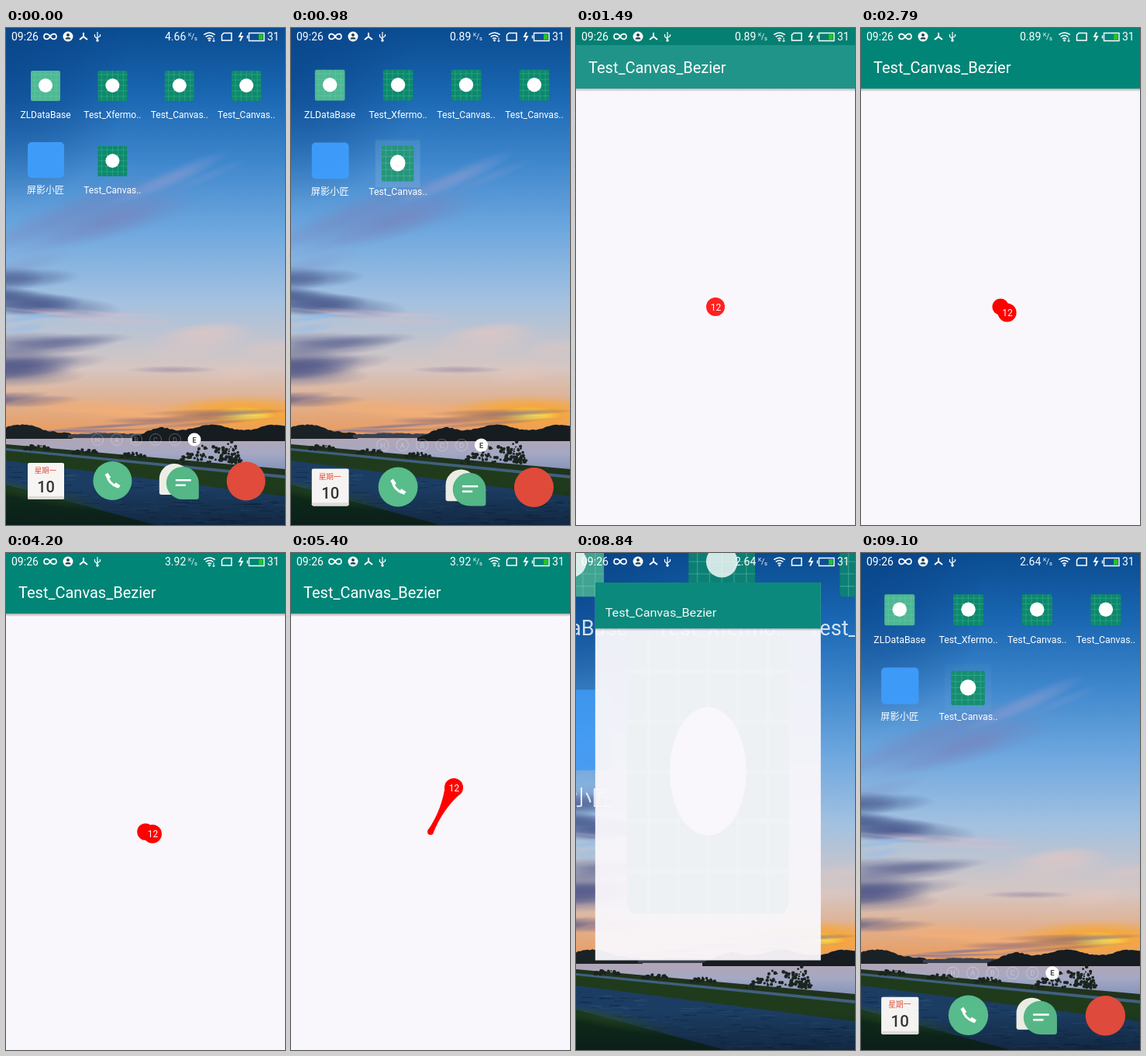
An HTML page with a canvas that plays this animation: 360x640 px, repeating every 9.14 s.

```html
<!DOCTYPE html>
<html lang="zh">
<head>
<meta charset="utf-8">
<style>
html, body { margin: 0; width: 100%; height: 100%; overflow: hidden; }
canvas { display: block; }
</style>
</head>
<body>
<canvas id="stage" width="360" height="640"></canvas>
<script>
const LOOP = 9140, TAU = Math.PI * 2;
const TEAL = '#008577', TILE = '#0d8a6c', RED = '#ff0000', PAPER = '#f9f7fb';
const GRID = { x: 51, y: 74, dx: 86.4, dy: 97 };
let ctx = document.getElementById('stage').getContext('2d');

const clamp = v => Math.max(0, Math.min(1, v));
const mix = (a, b, p) => a + (b - a) * p;

let seed = 7;
function random(low, high) {
  seed = (seed * 16807) % 2147483647;
  return mix(low, high, seed / 2147483647);
}

function rect(x, y, w, h, color, r = 0) {
  ctx.fillStyle = color;
  ctx.beginPath();
  ctx.roundRect(x, y, w, h, r);
  ctx.fill();
}
function disc(x, y, r, color) {
  ctx.fillStyle = color;
  ctx.beginPath();
  ctx.arc(x, y, r, 0, TAU);
  ctx.fill();
}
function stroke(d, width = 1.3, color = '#fff') {
  ctx.lineWidth = width;
  ctx.strokeStyle = color;
  ctx.stroke(new Path2D(d));
}
function label(s, x, y, size, align = 'center', color = '#fff', weight = 400) {
  ctx.font = `${weight} ${size}px Roboto, "Noto Sans CJK SC", "Noto Sans CJK", sans-serif`;
  ctx.textAlign = align;
  ctx.fillStyle = color;
  ctx.fillText(s, x, y);
}
function fade(y0, y1, ...colors) {
  const g = ctx.createLinearGradient(0, y0, 0, y1);
  colors.forEach((c, i) => g.addColorStop(i / (colors.length - 1), c));
  return g;
}

// Soft ellipse; rgb is "r,g,b"
function cloud(x, y, rx, ry, rgb, alpha, turn = 0) {
  ctx.save();
  ctx.translate(x, y);
  ctx.rotate(turn);
  ctx.scale(rx, ry);
  const g = ctx.createRadialGradient(0, 0, 0, 0, 0, 1);
  g.addColorStop(0, `rgba(${rgb},${alpha})`);
  g.addColorStop(0.5, `rgba(${rgb},${alpha * 0.6})`);
  g.addColorStop(1, `rgba(${rgb},0)`);
  disc(0, 0, 1, g);
  ctx.restore();
}
// A bank of wind-drawn streaks scattered around one centre
function streaks(count, x, y, rx, ry, rgb, alpha, turn = 0) {
  for (let i = 0; i < count; i++) {
    const along = random(-0.5, 0.5) * rx, across = random(-1, 1) * ry;
    cloud(x + along, y + across + along * Math.tan(turn), rx * random(0.4, 0.8),
      ry * random(0.3, 0.7), rgb, alpha, turn + random(-0.07, 0.07));
  }
}
// Ground layer whose upper edge runs from yLeft to yRight
function ground(yLeft, yRight, color) {
  ctx.fillStyle = color;
  ctx.beginPath();
  ctx.moveTo(0, yLeft);
  ctx.lineTo(360, yRight);
  ctx.lineTo(360, 640);
  ctx.lineTo(0, 640);
  ctx.fill();
}
function trees(x0, x1, base, height, color) {
  ctx.fillStyle = color;
  ctx.beginPath();
  ctx.moveTo(x0, base);
  for (let x = x0; x <= x1; x += 3) {
    const edge = clamp((x - x0) / 40) * clamp((x1 - x) / 60 + 0.15);
    ctx.lineTo(x, base - 4 - height * edge * (0.75 + 0.2 * Math.sin(x / 13)) - random(0, 1.5));
  }
  ctx.lineTo(x1, base);
  ctx.fill();
}
function bush(x, y, w, h) {
  for (let i = 0; i < w * 2; i++) {
    const dx = random(-1, 1);
    disc(x + dx * w, y - random(0, h) * (1 - dx * dx), random(1, 2.5), '#1b251f');
  }
}

function paintWallpaper() {
  rect(0, 0, 360, 530, fade(0, 525, '#0a4c90', '#1a67b3', '#4088cd', '#6fa8df',
    '#a3c1e0', '#d6c6c2', '#e99a5c'));
  cloud(0, 60, 160, 170, '6,58,125', 0.5);
  streaks(7, 90, 250, 190, 38, '120,128,185', 0.28, -0.35);
  streaks(5, 230, 190, 130, 18, '140,155,210', 0.25, -0.4);
  streaks(8, 10, 340, 120, 24, '62,78,132', 0.5);
  streaks(5, 10, 380, 90, 10, '150,188,230', 0.6, -0.1);
  streaks(5, 100, 366, 110, 9, '222,186,198', 0.4, 0.05);
  streaks(10, 25, 422, 130, 26, '72,80,132', 0.45, -0.06);
  streaks(6, 0, 472, 90, 14, '92,88,135', 0.55, -0.1);
  streaks(5, 300, 415, 110, 30, '238,200,190', 0.3, -0.1);
  cloud(215, 440, 60, 5, '150,135,165', 0.6);
  streaks(6, 120, 492, 170, 10, '246,175,115', 0.5);
  cloud(305, 496, 110, 24, '255,165,30', 0.95);
  cloud(306, 498, 42, 10, '255,240,90', 1);
  streaks(5, 230, 503, 130, 8, '140,105,120', 0.6, -0.04);
  streaks(5, 90, 517, 140, 5, '135,120,150', 0.7);

  rect(0, 526, 360, 60, fade(526, 570, '#b4a5b3', '#a4a8c4', '#8592b8'));
  trees(-60, 86, 529, 14, '#1a2226');
  trees(80, 190, 528, 2, '#39414f');
  trees(163, 420, 532, 17, '#161c20');
  ground(536, 568, '#1f331c');
  ground(541, 576, '#41607f');
  ground(544, 580, '#1f3b1c');
  ground(557, 603, '#1c3d63');
  for (let i = 0; i < 260; i++) {
    const x = random(0, 360), y = 562 + x * 0.13 + random(0, 70);
    rect(x, y, random(6, 24), 1, i % 2 ? 'rgba(8,22,42,.35)' : 'rgba(90,125,165,.16)');
  }
  ground(588, 685, '#0f2c1a');
  cloud(40, 600, 100, 12, '50,85,35', 0.5, 0.2);
  rect(0, 590, 360, 50, fade(590, 640, 'rgba(5,15,25,0)', 'rgba(5,15,25,.45)'));
  for (let x = 40; x < 200; x += 62) bush(x, 539 + x * 0.08, 16, 6);
  bush(262, 560, 42, 24);
  bush(290, 558, 14, 26);
}

// App tile, 38 units wide
function tile(x, y, sx, sy, color = TILE) {
  ctx.save();
  ctx.translate(x, y);
  ctx.scale(sx, sy);
  rect(-19, -19, 38, 39, color, 2);
  const alpha = ctx.globalAlpha;
  ctx.globalAlpha = alpha * 0.35;
  for (let i = -14; i < 19; i += 7)
    stroke(`M${i} -19V20M-19 ${i}H19`, 0.6, '#8fe0c4');
  ctx.globalAlpha = alpha;
  disc(0, 0, 9, '#fff');
  ctx.restore();
}

function paintDock() {
  const [calendar, phone, chat, browser] = [0, 1, 2, 3].map(i => GRID.x + i * GRID.dx);
  rect(calendar - 23, 560, 47, 47, '#f7f5f3', 2);
  rect(calendar - 23, 603, 47, 4, '#dedbd8', 2);
  label('星期一', calendar, 573, 9.5, 'center', '#e0503e');
  label('10', calendar + 0.5, 597.5, 20, 'center', '#333', 500);

  disc(phone, 583, 25, '#59bd8c');
  ctx.save();
  ctx.translate(phone, 583);
  stroke('M-7 -7Q-5 4 7 8', 3);
  stroke('M-8 -9l4 6M3 4l6 4', 4.5);
  ctx.restore();

  rect(chat - 26, 561, 39, 40, '#eceee6', [20, 20, 20, 3]);
  rect(chat - 17, 565, 42, 42, '#55b686', [21, 21, 3, 21]);
  rect(chat - 5, 581, 20, 2.5, '#fff');
  rect(chat - 5, 587.5, 13, 2.5, '#fff');

  disc(browser - 0.5, 583.5, 25, '#e04b3c');
}

function paintHome(p) {
  const zoom = Math.exp(1.05 * p);
  ctx.save();
  ctx.globalAlpha = 1 - 0.25 * p;
  ctx.translate(97, 124);
  ctx.scale(zoom, zoom);
  ctx.translate(-97, -124);

  ['ZLDataBase', 'Test_Xfermo..', 'Test_Canvas..', 'Test_Canvas..', '屏影小匠', 'Test_Canvas..']
    .forEach((name, i) => {
      const x = GRID.x + i % 4 * GRID.dx, y = GRID.y + (i >> 2) * GRID.dy;
      if (i === 4) rect(x - 23, y - 24, 47, 46, '#3f9bf8', 5);
      else tile(x, y, 1, 1, i ? TILE : '#4fb994');
      label(name, x, y + 42, 12);
    });

  [...'HABCDE'].forEach((letter, i) => {
    const x = 118 + i * 25, active = i === 5;
    if (active) disc(x, 530, 8.5, '#fff');
    else stroke(`M${x - 7.5} 530a7.5 7.5 0 1 1 15 0a7.5 7.5 0 1 1-15 0`, 1, 'rgba(255,255,255,.28)');
    label(letter, x, 533.5, 9, 'center', active ? '#444' : 'rgba(255,255,255,.35)', active ? 700 : 400);
  });
  paintDock();
  ctx.restore();
}

function paintStatus(t) {
  const speed = t < 360 ? '4.66' : t < 3300 ? '0.89' : t < 6360 ? '3.92' : '2.64';
  label('09:26', 7, 16, 14, 'left');
  stroke('M57 11C60 6 65 7 65 11S60 16 57 11S49 7 49 11S54 16 57 11', 1.6);
  disc(80, 11, 6.5, '#fff');
  disc(80, 9, 2, '#245');
  rect(76.5, 12, 7, 2.5, '#245', [3, 3, 0, 0]);
  stroke('M100 6V11L95 15M100 11L105 15', 2);
  stroke('M118 5V17M114.5 8V11L118 14M121.5 8V10.5L118 12.5', 1.2);
  disc(118, 16, 1.7, '#fff');
  label(speed, 205, 16, 14, 'left');
  label('K', 235, 11, 7, 'left');
  stroke('M239.5 15L242.5 7', 0.8);
  label('s', 243, 16, 7.5, 'left');
  for (let i = 1; i < 4; i++) {
    const w = i * 2.4, y = 16.5 - i * 2.6;
    stroke(`M${262.5 - w} ${y}Q262.5 ${y - w * 0.75} ${262.5 + w} ${y}`, 1.6);
  }
  disc(262.5, 16, 1.4, '#fff');
  if (t < 8190) stroke('M268 12.5V17.5M266.5 16L268 17.8L269.5 16', 1);
  stroke('M281 6.5H291V16H278.5V9Z', 1.5);
  stroke('M304 5.5L301 11H305L302 16.5', 1.8);
  stroke('M313.5 6.5H333V16.5H313.5ZM311.5 9.5V13.5', 1.4);
  rect(326, 8, 5.5, 7, '#22c522');
  label('31', 337, 16, 14, 'left');
}

// Position along [time, x, y] points, smoothed with a Catmull-Rom spline
function along(points, t) {
  const i = Math.max(0, points.findLastIndex(p => p[0] <= t));
  const at = k => points[Math.max(0, Math.min(points.length - 1, k))];
  const [a, b, c, d] = [at(i - 1), at(i), at(i + 1), at(i + 2)];
  const u = b === c ? 0 : (t - b[0]) / (c[0] - b[0]);
  const spline = k => b[k] + u / 2 * (c[k] - a[k]
    + u * (2 * a[k] - 5 * b[k] + 4 * c[k] - d[k]
    + u * (3 * (b[k] - c[k]) + d[k] - a[k])));
  return [spline(1), spline(2)];
}

const REST = [180, 359], RADIUS = 12, SNAP = 5550, BURST = 6390, GONE = 6890;
const TUG = [[2790, 188.5, 366.5], [3150, 209, 391], [3390, 206, 388]];
const PULL = [[4130, 186, 365], [4700, 221, 325], [5400, 210, 302],
  [5700, 269, 372], [5980, 136, 408], [BURST, 152, 424]];

function bubblePosition(t) {
  if (t < 2790) return REST;
  if (t < 3390) return along(TUG, t);
  if (t < 3590) {
    const u = (t - 3390) / 200 - 1, p = u * u * (6 * u + 5) + 1;
    const [x, y] = along(TUG, 3390);
    return [mix(x, REST[0], p), mix(y, REST[1], p)];
  }
  return t < 4130 ? REST : along(PULL, t);
}

function paintBubble(t) {
  if (t >= GONE) return;
  const [x, y] = bubblePosition(t), [sx, sy] = REST;
  const dist = Math.hypot(x - sx, y - sy);
  if (t < SNAP && dist > 0) {
    const r = RADIUS - dist / 8, mx = (x + sx) / 2, my = (y + sy) / 2;
    const nx = -(y - sy) / dist, ny = (x - sx) / dist;
    disc(sx, sy, r, RED);
    ctx.beginPath();
    ctx.moveTo(sx + nx * r, sy + ny * r);
    ctx.quadraticCurveTo(mx, my, x + nx * RADIUS, y + ny * RADIUS);
    ctx.lineTo(x - nx * RADIUS, y - ny * RADIUS);
    ctx.quadraticCurveTo(mx, my, sx - nx * r, sy - ny * r);
    ctx.fill();
  }
  disc(x, y, RADIUS * clamp((GONE - t) / (GONE - BURST)), RED);
  if (t < BURST) label('12', x + 0.5, y + 4.5, 12);
}

function paintApp(t, veil) {
  rect(0, 0, 360, 640, PAPER);
  rect(0, 78, 360, 4, fade(78, 82, 'rgba(0,0,0,.3)', 'rgba(0,0,0,0)'));
  rect(0, 0, 360, 78, TEAL);
  paintBubble(t);
  if (veil) {
    rect(0, 22, 360, 618, `rgba(249,247,251,${veil})`);
    rect(0, 0, 360, 22, `rgba(36,90,68,${veil})`);
  }
  label('Test_Canvas_Bezier', 16, 58, 20, 'left');
}

// p runs from 0 (icon) to 1 (full screen); py is the vertical share
function paintWindow(t, p, py, alpha, veil) {
  const left = mix(110.5, 0, p), right = mix(163.5, 360, p);
  const top = mix(145, 0, py), bottom = mix(198, 640, py);
  const w = right - left, h = bottom - top;
  tile((left + right) / 2, (top + bottom) / 2, w / 53, h / 53);
  ctx.save();
  ctx.globalAlpha = clamp(alpha);
  ctx.translate(left, top);
  ctx.scale(w / 360, h / 640);
  paintApp(t, veil);
  ctx.restore();
}

const wallpaper = document.createElement('canvas');
wallpaper.width = 360;
wallpaper.height = 640;
const screen = ctx;
ctx = wallpaper.getContext('2d');
paintWallpaper();
ctx = screen;

function frame(now) {
  const t = now % LOOP;
  if (t >= 1560 && t < 8840) {
    paintApp(t, 0);
  } else {
    const closing = t >= 8840;
    const u = clamp(closing ? (t - 8798) / 360 : (t - 940) / 540);
    const p = closing ? (1 - u) ** 2 : u * u * (3 - 2 * u);
    ctx.drawImage(wallpaper, 0, 0);
    paintHome(p);
    if (closing) paintWindow(t, p, p ** 1.19, p * 1.23, 0);
    else if (p > 0) paintWindow(t, p, p, p * 3, clamp((1560 - t) / 530));
  }
  paintStatus(t);
}

const start = performance.now();
(function tick() {
  frame(performance.now() - start);
  requestAnimationFrame(tick);
})();
</script>
</body>
</html>
```
